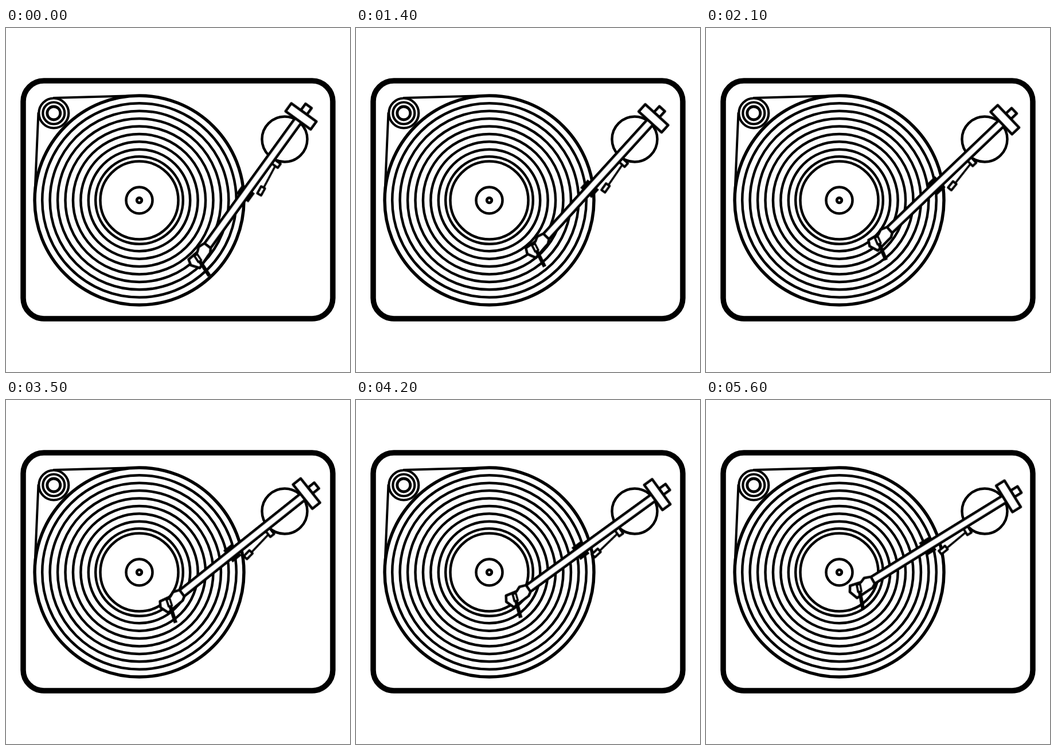
An HTML page for the animation above (6.3 s loop, 600 by 600 pixels).

```html
<!DOCTYPE html>
<html lang="en">
<head>
<meta charset="utf-8">
<title>Turntable</title>
<style>
  html, body { margin: 0; width: 100%; height: 100%; overflow: hidden; background: #fff; }
  svg { display: block; width: 100%; height: 100%; }
  #deck { fill: #fff; stroke: #000; stroke-width: 4.5; stroke-linejoin: round; }
  .solid { fill: #000; stroke: none; }
  #tonearm { transform-origin: 0 0; }
</style>
</head>
<body>
<svg viewBox="0 0 600 600">
  <g id="deck">
    <rect x="30" y="92" width="540" height="415" rx="36" stroke-width="9.5"/>
    <g id="record"></g>
    <path id="belt" fill="none" d="M227.7 118.1L82.3 122M56.5 147.3L50.2 292.5" stroke-width="4"/>
    <g id="pulley"></g>
    <circle cx="486" cy="194" r="39.5"/>

    <!-- The arm lies along the x axis, head to the left, pivot at 0,0. -->
    <g transform="translate(486 194)">
      <g id="tonearm">
        <rect class="solid" x="-126.5" y="-13.3" width="19.5" height="26.6"/>
        <path d="M-47 14L-90 20" stroke-width="3.5"/>
        <rect x="-47.5" y="7" width="8.5" height="12.5" stroke-width="4"/>
        <rect x="-7" y="-3.8" width="14" height="7.6" stroke-width="4"
              transform="translate(-97 19.7) rotate(-7)"/>
        <rect x="-232" y="-6.8" width="273" height="13.6"/>
        <rect x="57.5" y="-6.8" width="14" height="13"/>
        <rect x="40.5" y="-27.3" width="17" height="54"/>
        <path d="M-229 -7L-240 -11.3L-248.5 -8L-268 -12.8L-274 -3.8L-268.8 11.8L-257.7 11.5L-236 10.8L-229.5 7Z"/>
        <path d="M-254 -8.5L-259.5 6" stroke-width="9.5"/>
        <path d="M-258 2L-270 33.5" stroke-width="6.5"/>
        <path d="M-255 -5.5L-258.3 3.5" stroke="#fff" stroke-width="2.2"/>
      </g>
    </g>
  </g>
</svg>
<script>
  const STEP = 700;
  const START_ANGLE = -54.1;
  const TURNS = [0, 3.2, 6.4, 10.4, 12, 15.5, 18.1, 20.3, 22.4];

  function addRings(id, cx, cy, rings) {
    const group = document.getElementById(id);
    for (const [r, width] of rings) {
      const ring = document.createElementNS(group.namespaceURI, 'circle');
      const attrs = { cx, cy, r, 'stroke-width': width };
      for (const name in attrs) ring.setAttribute(name, attrs[name]);
      group.append(ring);
    }
  }

  const grooves = Array.from({ length: 7 }, (_, i) => [169.3 - 13.43 * i, 4.5]);
  addRings('record', 232.5, 300.5, [
    [182.5, 5.5], ...grooves, [76.3, 4.5], [68, 4.5], [23, 4.5], [4.3, 4.8]
  ]);
  addRings('pulley', 83.3, 148.5, [[26, 4.2], [19, 4.2], [11.5, 4.8]]);

  const frames = TURNS.map((turn, i) => ({
    transform: `rotate(${START_ANGLE + turn}deg)`,
    offset: i / TURNS.length,
    easing: 'steps(1, end)'
  }));
  frames.push({ transform: frames.at(-1).transform, offset: 1 });

  document.getElementById('tonearm').animate(frames, {
    duration: STEP * TURNS.length,
    iterations: Infinity
  });
</script>
</body>
</html>
```
